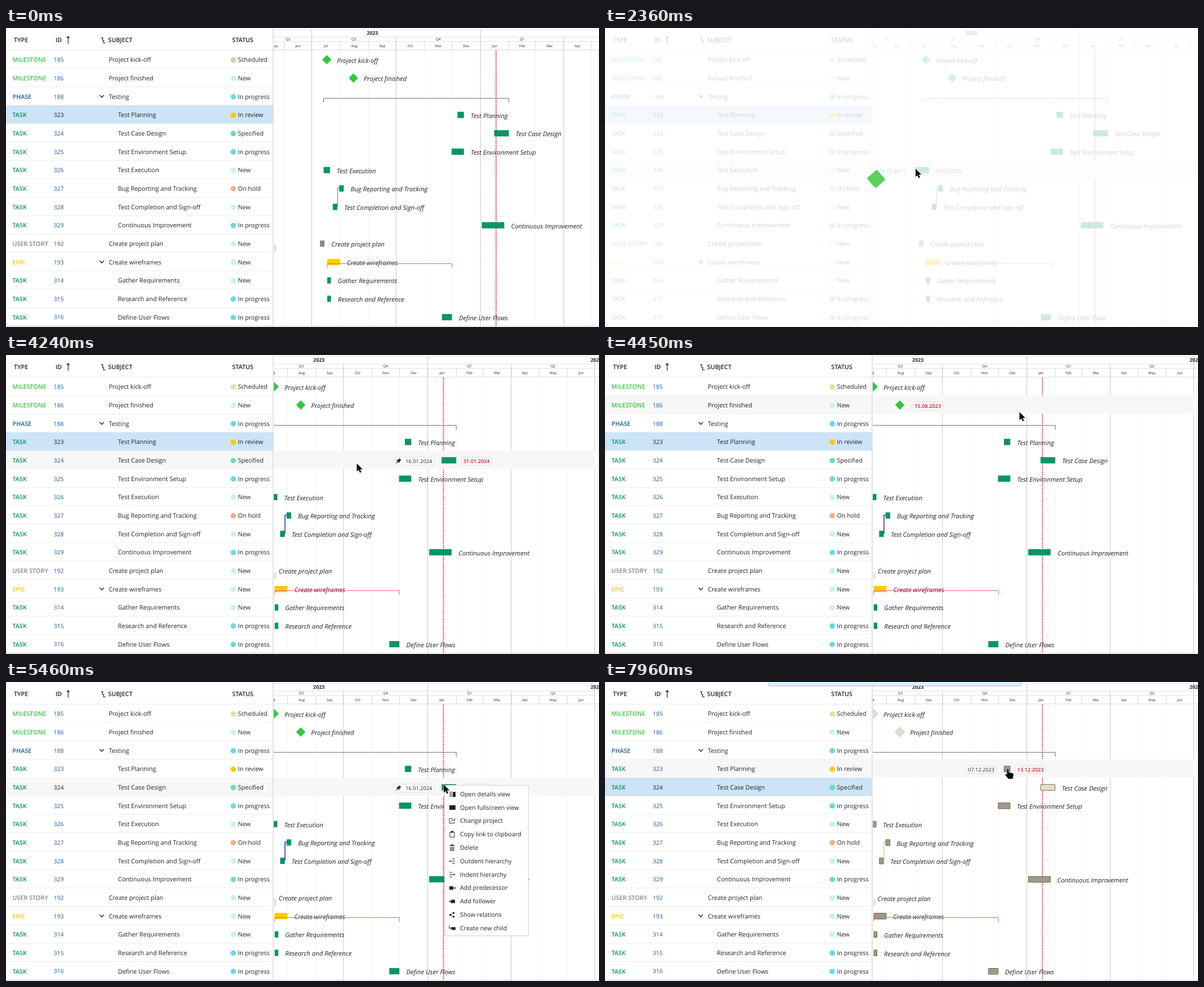
An HTML page with a canvas for the animation above (8 s loop, 1054 by 531 pixels).

```html
<!DOCTYPE html>
<html lang="en">
<head>
<meta charset="utf-8">
<title>Project timeline</title>
<style>
html, body { margin: 0; width: 100%; height: 100%; overflow: hidden; background: #fff; }
canvas { display: block; width: 1054px; height: 531px; }
</style>
</head>
<body>
<canvas id="stage"></canvas>
<script>
const W = 1054, H = 531, LOOP = 8000;
const DAY = 1.63, ORIGIN = 543.3, SCROLL = 93.5, LEFT = 476;
const ROW0 = 56.5, ROW = 32.66, TOP = 39.4;
const GREEN = '#0a9466', LIME = '#34c641', BLUE = '#1a5c96', RED = '#c4161c', INK = '#1f2328';
const FONT = '"Open Sans", "Noto Sans", sans-serif';

const T = { enter: 190, drag: 1510, dragEnd: 1760, release: 1970, load: 2170, reload: 3510,
  select: 4990, menu: 5130, browse: 5860, pick: 6740, predDate: 6870, leave: 7270 };

const TYPES = { MILESTONE: LIME, PHASE: BLUE, TASK: GREEN, 'USER STORY': '#858585', EPIC: '#ffc400' };
const STATUS = { Scheduled: '#c9d5a2', New: '#c3f6e4', 'In progress': '#66d9e8', 'In review': '#fcc800',
  Specified: '#62dfc0', 'On hold': '#f7ad80' };

// type, id, subject, status, first day and day after the last (days since 1 July)
const rows = [
  ['MILESTONE', 185, 'Project kick-off', 'Scheduled', 16, 17],
  ['MILESTONE', 186, 'Project finished', 'New', 45, 46],
  ['PHASE', 188, 'Testing', 'In progress', 13, 215],
  ['TASK', 323, 'Test Planning', 'In review', 159, 166],
  ['TASK', 324, 'Test Case Design', 'Specified', 199, 215],
  ['TASK', 325, 'Test Environment Setup', 'In progress', 152.6, 166],
  ['TASK', 326, 'Test Execution', 'New', 13, 20],
  ['TASK', 327, 'Bug Reporting and Tracking', 'On hold', 30, 35],
  ['TASK', 328, 'Test Completion and Sign-off', 'New', 23, 28],
  ['TASK', 329, 'Continuous Improvement', 'In progress', 185.5, 210],
  ['USER STORY', 192, 'Create project plan', 'New', 9, 14],
  ['EPIC', 193, 'Create wireframes', 'New', 17, 31],
  ['TASK', 314, 'Gather Requirements', 'New', 17, 21],
  ['TASK', 315, 'Research and Reference', 'In progress', 17, 21],
  ['TASK', 316, 'Define User Flows', 'In progress', 142, 153]
].map(([type, id, subject, status, from, to], i) =>
  ({ type, id, subject, status, from, to, i, y: ROW0 + ROW * i, top: TOP + ROW * i }));

// label, stroked part, filled part
const menuItems = [
  ['Open details view', 'M-5-3.5h5M-5-1h5M-5 1.5h5M-5 4h5', 'M1-4h5v9h-5z'],
  ['Open fullscreen view', '', 'M-5-4h11v8h-11z'],
  ['Change project', 'M1-4h-6v8h9v-2M-2 1q1-3 7-3M3-4l2 2-2 2', ''],
  ['Copy link to clipboard', 'M-4-4h8v9h-8z', 'M-2-6h4v3h-4z'],
  ['Delete', 'M-5-4h10M-3-2v7h6v-7M-1-2v6M1-2v6', 'M-2-6h4v2h-4z'],
  ['Outdent hierarchy', 'M0-4h5M-5 0h10M0 4h5M-3-2l-2 2 2 2', ''],
  ['Indent hierarchy', 'M-5-4h5M-5 0h10M-5 4h5M3-2l2 2-2 2', ''],
  ['Add predecessor', 'M2 0h4M4-2l2 2-2 2', 'M-5-3h7v6h-7z'],
  ['Add follower', 'M-6 0h4M-4-2l2 2-2 2', 'M-2-3h7v6h-7z'],
  ['Show relations', 'M3-4l-6 4 6 4', 'M-5-1.5h3v3h-3zM1-5h3v3h-3zM1 2h3v3h-3z'],
  ['Create new child', 'M-5-5v5h4M-3-2l2 2-2 2', 'M-1-2h7v5h-7z']
].map(([label, line, solid]) => ({ label, line: new Path2D(line), solid: new Path2D(solid) }));

// time, x, y of the pointer
const track = [
  [190, 720, 545], [940, 604, 258], [1010, 604, 258], [1280, 563, 251], [1500, 563, 251], [1760, 552, 250],
  [4080, 552, 250], [4460, 737, 101], [4830, 778, 182], [5820, 778, 182], [6600, 871, 365],
  [7230, 871, 365], [7940, 717, 155]
];

const canvas = document.getElementById('stage');
const c = canvas.getContext('2d');
const dpr = window.devicePixelRatio || 1;
canvas.width = W * dpr;
canvas.height = H * dpr;

const clamp = v => Math.max(0, Math.min(1, v));
const ramp = (t, a, b) => clamp((t - a) / (b - a));
const mix = (a, b, k) => a + (b - a) * k;
const ease = k => k * k * (3 - 2 * k);

function text(str, x, y, size, color = INK, style = '', align = 'left') {
  c.font = `${style} ${size}px ${FONT}`;
  c.textAlign = align;
  c.fillStyle = color;
  c.fillText(str, x, y + size * 0.36);
}

function rect(x, y, w, h, color) {
  c.fillStyle = color;
  c.fillRect(x, y, w, h);
}

function line(points, color, width = 1) {
  c.beginPath();
  points.forEach(([x, y]) => c.lineTo(x, y));
  c.strokeStyle = color;
  c.lineWidth = width;
  c.stroke();
}

function disc(x, y, r, color) {
  c.beginPath();
  c.arc(x, y, r, 0, 7);
  c.fillStyle = color;
  c.fill();
}

function panel(x, y, w, h, r, fill, border) {
  c.beginPath();
  c.roundRect(x, y, w, h, r);
  c.fillStyle = fill;
  c.fill();
  if (!border) return;
  shadow(0);
  c.strokeStyle = border;
  c.lineWidth = 1;
  c.stroke();
}

function shadow(alpha) {
  c.shadowColor = `rgba(0,0,0,${alpha})`;
  c.shadowBlur = alpha ? 3 * dpr : 0;
  c.shadowOffsetY = alpha ? dpr : 0;
}

function pointerAt(t) {
  let k = 0;
  while (k < track.length - 2 && t >= track[k + 1][0]) k++;
  const [ta, xa, ya] = track[k], [tb, xb, yb] = track[k + 1];
  const e = ease(ramp(t, ta, tb));
  return { x: mix(xa, xb, e), y: mix(ya, yb, e) };
}

function hoverAt(t, p) {
  if (t < T.enter) return -1;
  if (t >= T.menu && t < T.browse) return 4;
  if (t >= T.browse && t < T.leave) return -1;
  const i = Math.floor((p.y - TOP) / ROW);
  return i < rows.length ? i : -1;
}

const monthDay = m => (Date.UTC(2023, 6 + m, 1) - Date.UTC(2023, 6, 1)) / 864e5;
const dateText = day => {
  const d = new Date(Date.UTC(2023, 6, 1 + Math.round(day)));
  const two = n => String(n).padStart(2, '0');
  return `${two(d.getUTCDate())}.${two(d.getUTCMonth() + 1)}.${d.getUTCFullYear()}`;
};

function drawTable(s) {
  text('TYPE', 14, 21.5, 10.8, INK, '600');
  text('ID', 88, 21.5, 10.8, INK, '600');
  text('SUBJECT', 181.5, 21.5, 10.8, INK, '600');
  text('STATUS', 402, 21.5, 10.8, INK, '600');
  line([[110.5, 28], [110.5, 15.5]], INK, 1.2);
  line([[108, 18], [110.5, 15], [113, 18]], INK, 1.2);
  line([[169, 17.5], [173, 17.5]], INK, 1.2);
  line([[171.5, 18], [171.5, 22], [174.5, 22]], INK, 1.2);
  line([[173.5, 22], [173.5, 26.5], [177, 26.5]], INK, 1.2);
  rect(0, TOP - 0.7, 473.5, 1, '#e6e8ea');

  for (const r of rows) {
    rect(0, r.top + ROW - 0.7, 473.5, 1, '#eaecee');
    if (r.i === s.hover) rect(0, r.top, 474, ROW - 0.4, '#f7f7f7');
    else if (r.i === s.selected) rect(0, r.top, 474, ROW - 0.4, '#cce4f5');
    text(r.type, 11.5, r.y, 10.8, TYPES[r.type], '600');
    text(r.id, 84.8, r.y, 10.4, r.i === s.selected ? INK : BLUE);
    const parent = r.type === 'PHASE' || r.type === 'EPIC';
    if (parent) line([[166.5, r.y - 2.5], [170.3, r.y + 1.5], [174, r.y - 2.5]], INK, 1.4);
    text(r.subject, r.type === 'TASK' ? 199 : 182.7, r.y, 10.95);
    const dot = r.i === 0 && s.second ? '#d2ea9e' : STATUS[r.status];
    disc(404, r.y + 0.3, 4.8, dot);
    text(r.status, 412.3, r.y, 10.8);
  }
}

function drawGrid(s) {
  const first = s.x(s.second ? -53.5 : -51.5);
  const last = s.second ? s.x(366) : W;
  for (const y of [2.5, 15.5, 23.5, 38.5]) rect(LEFT, y, W - LEFT, 0.9, y === 38.5 ? '#d4d4d4' : '#dcdcdc');
  for (let m = -2; m < 14; m++) {
    const a = s.x(monthDay(m)), b = s.x(monthDay(m + 1));
    const left = Math.max(a, first);
    const date = new Date(Date.UTC(2023, 6 + m, 1));
    const name = date.toLocaleString('en', { month: 'short', timeZone: 'UTC' });
    rect(a - 0.4, 24, 0.9, 15, '#d4d4d4');
    if (m % 3) rect(a - 0.4, 40, 0.9, 490, '#f3f3f3');
    else rect(a - 0.5, m % 6 ? 16 : 2.5, 1, 527, '#cacaca');
    if (b <= last + 1 || !s.second) text(name, (left + b) / 2, 31.7, 6.3, INK, '', 'center');
  }
  for (let q = -1; q < 5; q++) {
    const a = Math.max(first, s.x(monthDay(q * 3))), b = s.x(monthDay(q * 3 + 3));
    text('Q' + ((q + 6) % 4 + 1), (a + b) / 2, 19.7, 6.3, INK, '', 'center');
  }
  text('2023', (first + s.x(184)) / 2, 9.3, 8.8, INK, 'bold', 'center');
  text('2024', 1142.5 - s.shift, 9.3, 8.8, INK, 'bold', 'center');
  rect(1051.5, 40, 1, 375, '#e6e6e6');
  c.setLineDash([2, 1.5]);
  line([[s.x(201.1), 40], [s.x(201.1), 529]], '#e0191f', 1.7);
  c.setLineDash([]);
}

function bracket(s, from, to, y, color) {
  const a = s.x(from), b = s.x(to);
  line([[a, y + 7.5], [a, y], [b, y], [b, y + 7.5]], color);
}

function dateTag(str, x, y, color, pin) {
  const w = pin ? 73 : 55;
  panel(x, y - 7, w, 14, 6, '#fff', '#dcdcdc');
  text(str, x + w - 51, y, 9.2, color, color === RED ? '600' : '');
  if (!pin) return;
  c.save();
  c.translate(x + 9, y);
  c.rotate(Math.PI / 4);
  rect(-2, -5, 4, 6, INK);
  rect(-3.5, 0, 7, 1.6, INK);
  rect(-0.5, 1, 1, 5, INK);
  c.restore();
}

function drawItem(s, r) {
  const hovered = r.i === s.hover;
  const milestone = r.type === 'MILESTONE';
  const from = r.i === 6 ? s.start : r.from;
  const a = s.x(from), b = s.x(r.to), mid = (a + b) / 2;
  const pale = `rgb(${s.gray},${s.gray},${s.gray})`;

  if (milestone) {
    c.beginPath();
    c.moveTo(mid, r.y - 8.6);
    c.lineTo(mid + 8.3, r.y - 0.3);
    c.lineTo(mid, r.y + 8);
    c.lineTo(mid - 8.3, r.y - 0.3);
    c.closePath();
    c.fillStyle = s.linking ? pale : LIME;
    c.fill();
    if (s.linking) {
      c.strokeStyle = '#e6b06a';
      c.lineWidth = 1;
      c.stroke();
    }
  } else if (r.type === 'PHASE') {
    bracket(s, from, r.to, 125, '#666');
  } else if (s.linking) {
    panel(a + 0.4, r.y - 5.2, b - a - 0.8, 10.5, 0.5, r.i === 4 ? pale : '#999', '#8a641a');
  } else {
    const color = r.type === 'EPIC' ? '#ffcc00' : r.type === 'TASK' ? GREEN : '#8c8c8c';
    rect(a, r.y - 5.7, b - a, 11.1, color);
  }

  const linked = s.linking && !milestone;
  if (!hovered && r.type !== 'PHASE')
    text(r.subject, milestone ? mid + 18.2 : b + 12.2 - linked * 0.5, r.y + 1 + linked * 0.6, 11.3, INK, 'italic');
  if (hovered || r.i === s.tagged) {
    if (!milestone) {
      const pin = r.i === 4;
      dateTag(dateText(from), a - 12.8 - (pin ? 73 : 55), r.y + 1.3, INK, pin);
    }
    dateTag(dateText(r.to - 1), milestone ? mid + 22.2 : b + 8.4, r.y + 1.3, RED);
  }
}

function drawGantt(s) {
  c.save();
  c.beginPath();
  c.rect(LEFT, 0, W - LEFT, H);
  c.clip();
  drawGrid(s);
  if (s.hover >= 0)
    rect(LEFT, rows[s.hover].top, (s.second ? 1047 : W) - LEFT, ROW - 0.4, '#f7f7f7');
  const link = s.linking ? '#b5b5b5' : s.second ? '#1c1ca0' : '#3c78a0';
  const lx = s.x(28) + 0.4;
  line([[lx - 1, 317], [lx, 317], [lx, 284.5], [s.x(30), 284.5]], link, s.second && !s.linking ? 1.4 : 1);
  rows.forEach(r => drawItem(s, r));
  bracket(s, 17, 153, 418.5, '#e0696b');
  c.restore();
  rect(474, 0, 1.5, 530, '#dadada');
  rect(477, 386, 1, 11, '#c4c4c4');
  rect(479, 386, 1, 11, '#c4c4c4');
  rect(0, 529.3, W, 1, '#cfcfcf');
}

function drawMenu(t, p) {
  shadow(0.08);
  panel(779.5, 183.5, 149, 267, 1, '#fff', '#d6d6d6');
  menuItems.forEach((item, i) => {
    const y = 198.8 + 23.82 * i;
    if (t > T.browse && Math.abs(p.y - y) < 11.9) rect(780, y - 11.9, 148, 23.8, '#efefef');
    c.save();
    c.translate(793, y + 0.3);
    c.strokeStyle = c.fillStyle = INK;
    c.lineWidth = 1;
    c.stroke(item.line);
    c.fill(item.solid);
    c.restore();
    text(item.label, 807, y, 10.8);
  });
}

// A square that wanders between four corners, turning and shrinking on the way
function drawLoader(t) {
  const u = ((t - T.load + 1370) % 1800) / 450;
  const leg = Math.floor(u), k = ease(u - leg);
  const corners = [[0, 0], [1, 0], [1, 1], [0, 1], [0, 0]];
  const [xa, ya] = corners[leg], [xb, yb] = corners[leg + 1];
  const scale = leg % 2 ? mix(0.5, 1, k) : mix(1, 0.5, k);
  c.save();
  c.translate(482 + 42 * mix(xa, xb, k), 245 + 42 * mix(ya, yb, k));
  c.rotate(-Math.PI / 2 * (leg + k));
  c.scale(scale, scale);
  panel(-16.3, -16.3, 32.6, 32.6, 3, '#5bcf62');
  c.restore();
}

const arrow = new Path2D('M0 0V14.5L3.3 11.4L5.6 16.6L8 15.5L5.8 10.5H10.3Z');
const hand = new Path2D('M-2.5 1q0-2 1.5-2t1.5 2v4.5l5.5 1q3 .6 3 3l-1 6q-.3 1.5-2 1.5h-5q-1.5 0-2.5-1.5l-4-5.5q0-2 2-1.5l1 1z');

function drawPointer(t, p, s) {
  const press = ramp(t, 1150, 1270) * (1 - ramp(t, T.release, T.release + 130));
  const edge = s.x(s.start);
  if (press) {
    c.globalAlpha = press * 0.75;
    disc(edge, 251, 9, '#f4e800');
    c.globalAlpha = 1;
  }
  if (t > 1200 && t < T.release) {
    line([[edge - 1.2, 246], [edge - 1.2, 256.5]], INK, 1.3);
    line([[edge - 2, 251], [edge - 7.5, 251]], INK, 1.1);
    line([[edge - 5.2, 248.6], [edge - 7.8, 251], [edge - 5.2, 253.4]], INK, 1.1);
    return;
  }
  c.save();
  c.translate(p.x, p.y);
  const shape = t > 7880 ? hand : arrow;
  c.strokeStyle = 'rgba(255,255,255,.8)';
  c.lineWidth = 1;
  c.stroke(shape);
  c.fillStyle = '#0a0a0a';
  c.fill(shape);
  c.restore();
}

function draw(t) {
  const p = pointerAt(t);
  const second = t >= T.reload;
  const shift = second ? SCROLL : 0;
  const state = {
    second, shift,
    x: day => ORIGIN + day * DAY - shift,
    hover: hoverAt(t, p),
    selected: t < T.select ? 3 : 4,
    start: t < T.drag ? 13 : Math.round(mix(11, 5, ramp(t, T.drag, T.dragEnd - 10))),
    linking: t >= T.pick,
    tagged: t >= T.predDate && t < T.leave ? 10 : -1,
    gray: Math.round(mix(153, 222, ramp(t, T.pick, 7060)))
  };

  c.setTransform(dpr, 0, 0, dpr, 0, 0);
  c.textRendering = 'geometricPrecision';
  rect(0, 0, W, H, '#fff');
  drawTable(state);
  drawGantt(state);

  if (t >= T.load && t < T.reload) {
    rect(0, 0, W, H, `rgba(255,255,255,${0.8 * ramp(t, T.load - 20, T.load + 100)})`);
    drawLoader(t);
  }
  if (t >= T.menu && t < T.pick) drawMenu(t, p);
  if (t >= T.pick) {
    shadow(0.15);
    panel(290.5, -20, 449, 26.5, 2, '#def0fb', '#a3d3ee');
  }
  if (t >= T.enter) drawPointer(t, p, state);
}

const began = performance.now();
function tick() {
  draw((performance.now() - began) % LOOP);
  requestAnimationFrame(tick);
}
tick();
</script>
</body>
</html>
```
